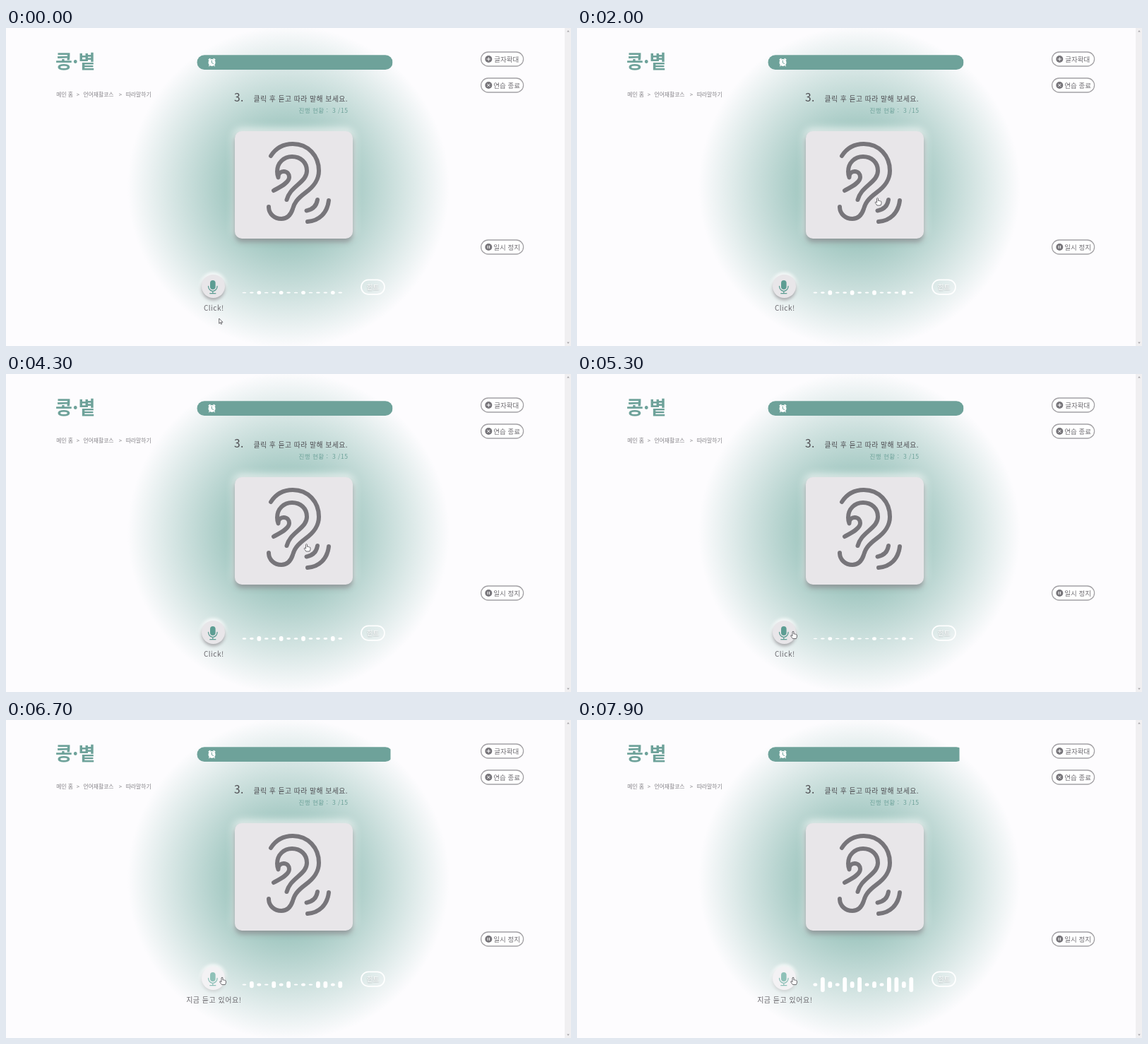
Animation, 800 px wide and 450 px high, one loop 8 s. Source, as an HTML page:

```html
<!DOCTYPE html>
<html lang="ko">
<head>
<meta charset="utf-8">
<title>따라말하기</title>
<style>
html, body { margin: 0; width: 100%; height: 100%; overflow: hidden; }
#stage {
  position: relative; width: 800px; height: 450px; overflow: hidden;
  background: radial-gradient(circle 228px at 400px 225px, #70aba0, #fdfcfe) #fdfcfe;
  font-family: "Noto Sans CJK KR", "Noto Sans CJK", "Noto Sans KR", sans-serif;
}
#stage > * { position: absolute; }
#card {
  left: 324px; top: 146px; width: 167px; height: 152px; border-radius: 10px;
  background: #e8e6e9;
  box-shadow: 0 5px 7px rgba(90, 85, 92, .5), 0 -2px 12px 2px rgba(255, 255, 255, .75);
}
#mic {
  left: 276.5px; top: 349px; width: 33px; height: 33px; border-radius: 50%;
  background: #e8e6e9;
  box-shadow: 0 3px 4px rgba(90, 85, 92, .45), 0 -2px 5px 1px rgba(255, 255, 255, .9);
}
#mic.on {
  background: #f3f2f4;
  box-shadow: 0 2px 4px rgba(90, 85, 92, .22), 0 -2px 5px 1px rgba(255, 255, 255, .9);
}
svg { left: 0; top: 0; }
.line { fill: none; stroke-linecap: round; stroke-linejoin: round; }
.hint { text-shadow: 0 1px 2px rgba(80, 80, 85, .4); }
</style>
</head>
<body>
<div id="stage">
  <div id="card"></div>
  <div id="mic"></div>
  <svg width="800" height="450" viewBox="0 0 800 450">
    <defs><clipPath id="pill"><rect x="270.5" y="38.3" width="277" height="20.700" rx="10.350"/></clipPath></defs>

    <rect x="791" width="9" height="450" fill="#f0eff1"/>
    <path d="M794.200 5.500l1.800-2.200 1.800 2.200zM794.200 444.500l1.800 2.200 1.800-2.200z" fill="#a5a3a7"/>

    <text x="70" y="57" font-size="26" font-weight="700" fill="#6ea29a">콩·볕</text>

    <g font-size="7.8" fill="#858388">
      <text x="71.300" y="97">메인 홈</text>
      <text x="99.800" y="97">&gt;</text>
      <text x="109.500" y="97">언어재활코스</text>
      <text x="159.800" y="97">&gt;</text>
      <text x="169.700" y="97">따라말하기</text>
    </g>

    <g clip-path="url(#pill)"><rect id="time" x="270" y="38" height="22" fill="#6ea29a"/></g>
    <g class="line" stroke="#fff">
      <circle cx="291.5" cy="48.900" r="5" fill="#fff" stroke="none"/>
      <path d="M287.200 44.800l1.600-1.200M295.800 44.800l-1.600-1.200" stroke-width="1.600"/>
      <path d="M288.500 52.500l-.9 1.200M294.500 52.500l.9 1.200" stroke-width="1.200"/>
      <path d="M291.300 46v3.200l2.200 1.300" stroke="#6ea29a" stroke-width="1"/>
    </g>

    <g fill="#4d4b50">
      <text x="323" y="104" font-size="15.500" letter-spacing=".4">3.</text>
      <text x="350.500" y="103.500" font-size="9.800" letter-spacing=".5">클릭 후 듣고 따라 말해 보세요.</text>
      <g font-size="8.500" fill="#6ea29a" letter-spacing=".5">
        <text x="414.500" y="120.300">진행 현황 :</text>
        <text x="462" y="120.300">3 /15</text>
      </g>
      <text id="label" x="294.300" y="400.200" font-size="10" letter-spacing=".5" text-anchor="middle" fill="#6b696e"></text>
    </g>

    <g class="line" stroke="#77757a" stroke-width="6">
      <path d="M375 181C382 170 393 164 406 164C428 164 443 181 443 202C443 216 435 225 424 233C412 242 408 248 406 256C403 265 398 270 390 270C380 270 372 263 372 253"/>
      <path d="M397.500 243C400 234 405 229 413 222C421 215 426 210 426 202C426 190 417 182 405 182C393 182 384 191 384 203C384 206 384.500 209 385.500 211.500C385 205 390 203 393 203C398.500 203 401 207 401 211C401 219 388 225 379 230"/>
      <path d="M441 243Q439 256 425.500 258.500M457 244C455 262 443 273 427 274"/>
    </g>

    <g id="micIcon">
      <rect x="289" y="357" width="7.600" height="13" rx="3.800"/>
      <path class="line" d="M286.500 365.500a6.300 6.800 0 0 0 12.600 0M292.800 372.500v3M288.800 375.700h8" stroke-width="1.300"/>
    </g>
    <g id="bars" fill="#fff"></g>

    <rect x="503" y="356.300" width="33" height="20.500" rx="10.250" fill="none" stroke="#fff" stroke-width="1.700"/>
    <text class="hint" x="519.600" y="369.700" font-size="9.500" text-anchor="middle" fill="#fff">힌트</text>

    <g id="buttons" font-size="9.500" fill="#6f6d72"></g>

    <g stroke="#4b494e" stroke-width=".8" stroke-linejoin="round" fill="#fff">
      <path id="arrow" d="M0 0v7.200l1.700-1.500 1.100 2.500 1.200-.5-1.100-2.400h2.300z"/>
      <path id="hand" d="M-1 .8Q0-.7 1 .8V4Q2 3.200 2.700 4.200Q3.700 3.600 4.200 4.700Q5.400 4.400 5.400 5.700V8L4.400 10.500H-.6L-3.200 6.900Q-3.400 5.300-2 5.700L-1 6.700z"/>
    </g>
  </svg>
</div>
<script>
const $ = id => document.getElementById(id);
const LOOP = 8000, CLICK = 5500;
const KINDS = 'CBACBABCACBBAB';

const bars = [...KINDS].map((kind, i) => {
  const el = document.createElementNS('http://www.w3.org/2000/svg', 'rect');
  el.setAttribute('x', 334.5 + i * 10.45);
  el.setAttribute('width', 5.8);
  $('bars').append(el);
  return { el, kind };
});

const pillButton = (y, textX, label, sign) => `
  <rect x="672.6" y="${y - 10}" width="60" height="20" rx="10" fill="#fff" stroke="#a3a1a5" stroke-width="1.3"/>
  <circle cx="683.3" cy="${y}" r="5" fill="#77757a"/>
  <path transform="translate(683.3 ${y})" d="${sign}" stroke="#fff" stroke-width="1"/>
  <text x="${textX}" y="${y + 3.5}">${label}</text>`;
$('buttons').innerHTML =
  pillButton(44, 691.3, '글자확대', 'M-2.6 0h5.2M0-2.6v5.2') +
  pillButton(81, 690.3, '연습 종료', 'M-1.9-1.9l3.8 3.8M1.9-1.9l-3.8 3.8') +
  pillButton(310, 690.3, '일시 정지', 'M-1.2-2v4M1.2-2v4');

// Linear interpolation over [time, value] pairs
function track(keys, t) {
  const i = keys.findIndex(k => k[0] > t);
  if (i < 0) return keys[keys.length - 1][1];
  if (i === 0) return keys[0][1];
  const [t0, a] = keys[i - 1], [t1, b] = keys[i];
  return a + (b - a) * (t - t0) / (t1 - t0);
}
const ease = (t, a, b) => {
  const u = Math.min(1, Math.max(0, (t - a) / (b - a)));
  return u * u * (3 - 2 * u);
};

const LEVEL = [[0, 5], [1200, 6.2], [2900, 7], [4500, 7], [5500, 4], [5900, 1.5], [6100, 2], [7100, 14.5], [7900, 21]];
const SWAY = [[0, 1], [.4, 1], [.6, 0], [.9, 0], [1, 1]];

function drawBars(t) {
  const level = track(LEVEL, t), a = track(SWAY, t % 1000 / 1000);
  const size = { A: .43 + .57 * a, B: 1 - .6 * a, C: .21 + .13 * a };
  for (const { el, kind } of bars) {
    const h = level * size[kind];
    el.setAttribute('y', 374.5 - h / 2);
    el.setAttribute('height', h);
    el.setAttribute('rx', 2.9);
    el.setAttribute('ry', Math.min(2.9, h / 2));
  }
}

function drawCursor(t) {
  const drift = ease(t, 900, 1200), up = ease(t, 1250, 2000), down = ease(t, 4400, 5300);
  const x = 301.7 - 1.5 * drift + 125.3 * up - 119.5 * down;
  const y = 411 - 2 * drift - 168.5 * up + 123.5 * down;
  const onCard = x > 324 && x < 491 && y > 146 && y < 298;
  const onMic = Math.hypot(x - 293, y - 365.5) < 17;
  const hand = onCard || onMic;
  for (const [id, show] of [['arrow', !hand], ['hand', hand]]) {
    $(id).setAttribute('transform', `translate(${x} ${y})`);
    $(id).setAttribute('visibility', show ? 'visible' : 'hidden');
  }
}

function render(t) {
  const on = t >= CLICK, tint = on ? '#8fc1b8' : '#5d9d93';
  $('time').setAttribute('width', 277.5 - Math.max(0, t - CLICK) * .0025);
  $('mic').className = on ? 'on' : '';
  $('micIcon').setAttribute('fill', tint);
  $('micIcon').setAttribute('stroke', tint);
  $('micIcon').setAttribute('stroke-width', 0);
  $('label').textContent = on ? '지금 듣고 있어요!' : 'Click!';
  drawBars(t);
  drawCursor(t);
}

const start = performance.now();
function tick() {
  render((performance.now() - start) % LOOP);
  requestAnimationFrame(tick);
}
tick();
</script>
</body>
</html>
```
